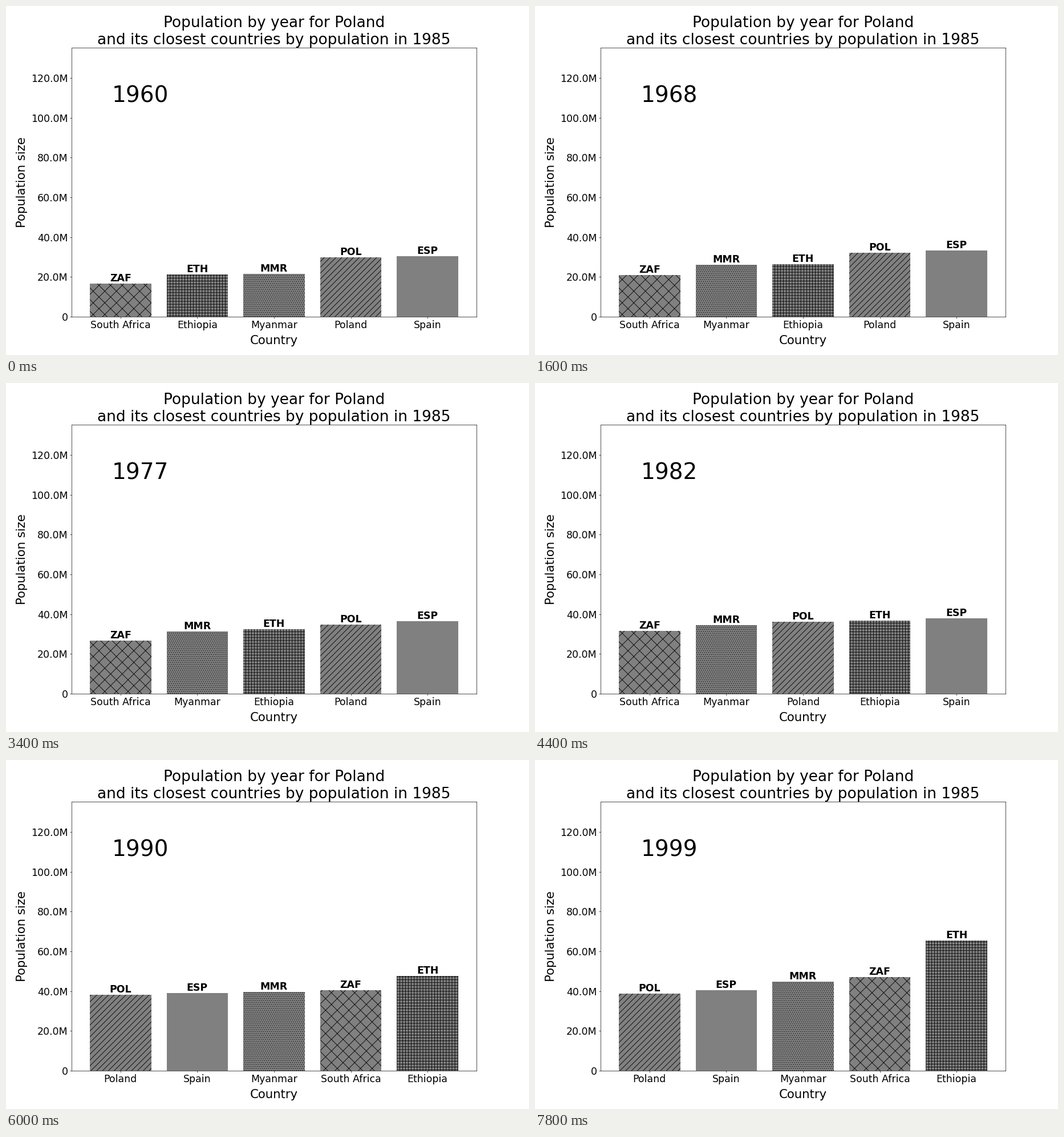
A matplotlib script that plays this animation: 917 by 611 pixels, repeating every 8000 ms.

```python
import numpy as np
import matplotlib.pyplot as plt
from matplotlib.animation import FuncAnimation
from matplotlib.collections import LineCollection
from matplotlib.transforms import IdentityTransform

WIDTH, HEIGHT = 917, 611
COLS, ROWS = 15, 10        # stage size in inches, also the texture tiles
DPI = WIDTH / COLS
FIRST, LAST = 1960, 1999
DOT, DOT_STEP = 1.8, 4     # dot size and spacing in points


def diagonals(per_tile, lean):
    """Slanted lines from top to bottom; lean is 1 or -1."""
    return [((k / per_tile, 0), (k / per_tile + lean * ROWS, ROWS))
            for k in range(-ROWS * per_tile, (COLS + ROWS) * per_tile)]


def grid(per_tile):
    mids = (np.arange(COLS * per_tile) + 0.5) / per_tile
    return ([((m, 0), (m, ROWS)) for m in mids]
            + [((0, m), (COLS, m)) for m in mids])


def dot_rows(per_tile):
    """Lower half of the stage; every other row is shifted by half a step."""
    return [((r % 2 / 2 / per_tile, r / per_tile), (COLS, r / per_tile))
            for r in range(ROWS * per_tile // 2, ROWS * per_tile)]


def texture(lines, **style):
    """Black line pattern measured in tiles from the top left corner."""
    segments = np.array(lines) * DPI
    segments[..., 1] = HEIGHT - segments[..., 1]
    art = LineCollection(segments, colors="black", zorder=1.5,
                         transform=IdentityTransform(), **style)
    art.set_snap(False)
    ax.add_collection(art, autolim=False)
    return art


class Country:
    """Steady growth in millions plus one smooth change around a middle year."""

    def __init__(self, code, name, start, slope, change, middle, span, art=None):
        self.code, self.name, self.art = code, name, art
        self.curve = start, slope, change, middle, span
        self.bar = ax.bar(0, 1, color="grey")[0]
        self.label = ax.text(0, 0, code, ha="center", va="bottom",
                             fontsize=20.5, weight="bold")

    def population(self, year):
        start, slope, change, middle, span = self.curve
        return (start + slope * (year - FIRST)
                + change / (1 + np.exp((middle - year) / span)))

    def place(self, slot, year):
        height = self.population(year)
        self.bar.set_x(slot - self.bar.get_width() / 2)
        self.bar.set_height(height)
        self.label.set_position((slot, height))
        if self.art:
            self.art.set_clip_path(self.bar)


plt.rcParams["font.family"] = "DejaVu Sans"
fig, ax = plt.subplots(figsize=((WIDTH + 0.01) / DPI, (HEIGHT + 0.01) / DPI),
                       dpi=DPI, facecolor="white")

dots = dict(linewidths=DOT, capstyle="round",
            linestyles=(0, (0.01, DOT_STEP / DOT - 0.01)))
countries = [
    Country("ZAF", "South Africa", 16.52, 0.517, 10.6, 1984.7, 4,
            texture(diagonals(3, 1) + diagonals(3, -1), linewidths=1)),
    Country("ETH", "Ethiopia", 21.3, 0.62, 27, 1994.2, 4.7,
            texture(grid(12), linewidths=1)),
    Country("MMR", "Myanmar", 21.63, 0.56, 1.4, 1984, 2.5,
            texture(dot_rows(18), **dots)),
    Country("POL", "Poland", 29.8, 0.293, -3.4, 1996, 3,
            texture(diagonals(6, -1), linewidths=1)),
    Country("ESP", "Spain", 30.45, 0.355, -4.2, 1990, 4),
]
year_text = ax.text(0.1, 0.798, "", fontsize=46, transform=ax.transAxes)

ax.set_title("Population by year for Poland\n"
             "and its closest countries by population in 1985",
             fontsize=31, pad=8)
ax.set_xlabel("Country", fontsize=25, labelpad=10)
ax.set_ylabel("Population size", fontsize=25, labelpad=7.5)
ax.set_xlim(-0.64, 4.64)
ax.set_ylim(0, 135.2)
ax.set_xticks(range(len(countries)))
ticks = np.arange(0, 121, 20)
ax.set_yticks(ticks, [f"{t:.1f}M" if t else "0" for t in ticks])
ax.tick_params(labelsize=20.5)


def update(frame):
    year = FIRST + frame
    ranked = sorted(countries, key=lambda c: c.population(year))
    for slot, country in enumerate(ranked):
        country.place(slot, year)
    ax.set_xticklabels([c.name for c in ranked])
    year_text.set_text(str(year))
    return [year_text]


anim = FuncAnimation(fig, update, frames=LAST - FIRST + 1, interval=200,
                     init_func=lambda: update(0), repeat=True, blit=False)
plt.show()
```
